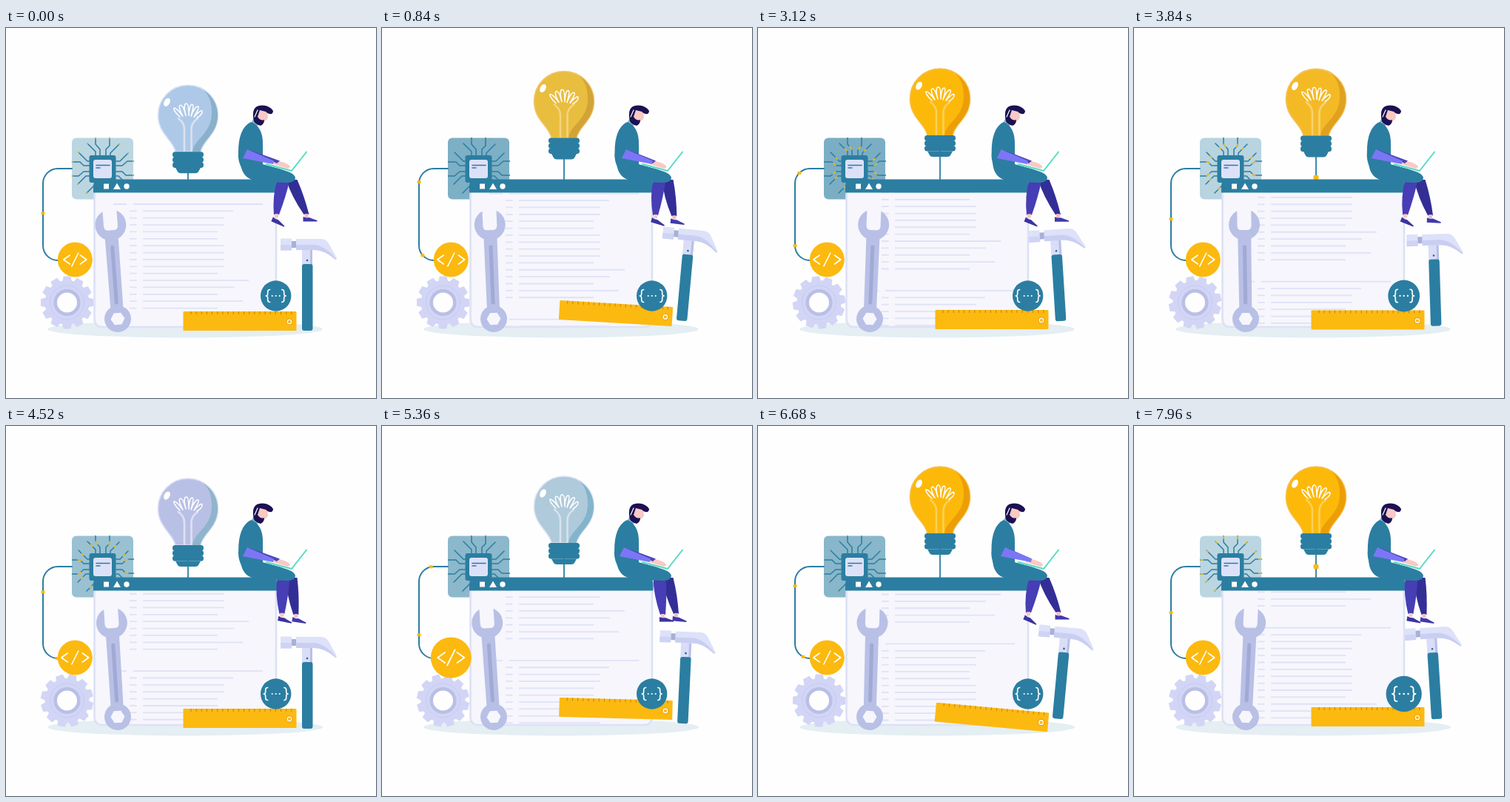
An HTML page that plays this animation: 500 by 500 pixels, repeating every 8000 ms.

```html
<!DOCTYPE html>
<html lang="en">
<head>
<meta charset="utf-8">
<title>Development tools</title>
<style>
html, body { margin: 0; width: 100%; height: 100%; overflow: hidden; background: #fefefe; }
svg { display: block; width: 100%; height: 100%; }
.line { fill: none; stroke-linecap: round; stroke-linejoin: round; }
</style>
</head>
<body>
<svg viewBox="0 0 500 500">
  <defs>
    <clipPath id="page"><rect x="120" y="222" width="245" height="182"/></clipPath>
  </defs>
  <ellipse cx="242" cy="407" rx="186" ry="11.5" fill="#e4eef3"/>

  <g id="board">
    <rect id="plate" x="89" y="148.500" width="83" height="83" rx="6" fill="#2b7ea1"/>
    <g id="traces" class="line" transform="translate(131 190)" stroke="#2b7ea1" stroke-width="1.5"></g>
    <g id="pulses" class="line" transform="translate(131 190)" stroke="#fcc11e" stroke-width="1.5" style="stroke-linecap:butt"></g>
    <rect x="112.500" y="172" width="36" height="37" rx="3" fill="#2b7ea1"/>
    <rect x="118" y="178" width="25" height="25" rx="3" fill="#dde1f8"/>
    <path class="line" d="M122 185.500h18M122 189h5" stroke="#2b7ea1" stroke-width="1.500"/>
  </g>

  <path id="cable" class="line" d="M70 314a20 20 0 0 1-20-20V210a20 20 0 0 1 20-20H89" stroke="#2b7ea1" stroke-width="2"/>
  <g id="cableDots" fill="#fcb90f"></g>

  <path d="M246 165V206" stroke="#2b7ea1" stroke-width="1.800"/>
  <rect id="wireDot" x="242.500" y="-3" width="7" height="6" rx="1.500" fill="#fcb90f"/>
  <g id="bulb">
    <path id="glass" stroke-width="1.600" d="M229 145C226 129 205.500 121 205.500 95.500A40.500 40.500 0 0 1 286.500 95.500C286.500 121 266 129 263 145Z"/>
    <path id="shade" d="M267 61.500A40 40 0 0 1 286 95.500C286 121 266 129 262.500 145H252C254 128 277 121 278 94C278.500 80 275 69 267 61.500Z"/>
    <path id="stems" class="line" stroke-width="2.600" d="M233 100Q241 106 241 114V145M259 100Q250.500 106 250.500 114V145"/>
    <path class="line" stroke="#fff" stroke-width="1.500" d="M235 98C228 92 225 85 228 86C232 87 238 96 239 97C234 88 233 82 236 82C239 82 242 92 243 96C240 84 241 79 244 80C247 80 247 90 247 96C247 88 249 80 252 81C255 83 251 92 250 97C252 91 257 82 260 84C262 86 256 94 254 98C259 92 264 88 265 90C266 93 262 97 258 99"/>
    <ellipse cx="217.500" cy="78" rx="3.800" ry="6" transform="rotate(28 217.500 78)" fill="#fff"/>
    <g fill="#2b7ea1">
      <rect x="225" y="145" width="42" height="7.600" rx="3.600"/>
      <rect x="225" y="152" width="42" height="7.600" rx="3.600"/>
      <rect x="225" y="159" width="42" height="7.600" rx="3.600"/>
      <path d="M229 166.500H263L260 172Q259 174 256 174H236Q233 174 232 172Z"/>
    </g>
  </g>

  <path d="M119.500 215V394a10 10 0 0 0 10 10H355a10 10 0 0 0 10-10V215Z" fill="#f6f6fc" stroke="#dde1f6" stroke-width="2.600"/>
  <g clip-path="url(#page)"><path id="code" stroke="#dfe2f7" stroke-width="1.800" fill="none"/></g>
  <path d="M118 222.500V212.500a8 8 0 0 1 8-8H358.500a8 8 0 0 1 8 8V222.500Z" fill="#2b7ea1"/>
  <path d="M132 210.500h7v7h-7ZM145 218l5-8.500 5 8.500Z" fill="#fff"/>
  <circle cx="163" cy="214" r="3.700" fill="#fff"/>

  <g id="gear" fill="#d2d5f5"><circle r="30"/></g>
  <g transform="translate(82.500 371)">
    <circle r="23" fill="none" stroke="#c3c8ee" stroke-width=".8"/>
    <circle r="15.800" fill="#fefefe" stroke="#b9bfe5" stroke-width="4.500"/>
  </g>

  <g id="wrench">
    <path d="M-9.500-146A21 21 0 1 0 9.500-146V-126Q9.500-120 4-120H-4Q-9.500-120-9.500-126Z" fill="#b9c0e6"/>
    <path d="M-9-112H9L8.500-10H-8.500Z" fill="#b9c0e6"/>
    <path class="line" d="M0-97V-22" stroke="#a1a9d5" stroke-width="5"/>
    <circle r="18" fill="#b9c0e6"/>
    <path d="M-9.500 0L-4.800-8H4.800L9.500 0L4.800 8H-4.800Z" fill="#f6f6fc"/>
  </g>

  <g id="ruler">
    <rect x="-76.500" y="-13" width="153" height="26" rx="1" fill="#fcb910"/>
    <path id="ticks" stroke="#c98612" stroke-width="1.100"/>
    <circle cx="67" cy="1" r="2.900" fill="#fcb910" stroke="#fff" stroke-width="1.500"/>
    <circle cx="67" cy="1" r="4" fill="none" stroke="#d88f10" stroke-width=".7"/>
  </g>

  <g id="codeBadge">
    <circle r="23.500" fill="#fcb90f"/>
    <g class="line" stroke="#fff" stroke-width="1.600">
      <path d="M4.500-9L-4.500 9"/>
      <path class="left" d="M-7-6L-15.500 0L-7 6"/><path class="right" d="M7-6L15.500 0L7 6"/>
    </g>
  </g>
  <g id="braceBadge">
    <circle r="20.700" fill="#2b7ea1"/>
    <path class="line" d="M-5 0h0M0 0h0M5 0h0" stroke="#fff" stroke-width="2.200"/>
    <g class="line" stroke="#fff" stroke-width="1.600">
      <path class="left" d="M-8-8.500Q-11-8.500-11-5.500V-3Q-11 0-13.500 0Q-11 0-11 3V5.500Q-11 8.500-8 8.500"/>
      <path class="right" d="M8-8.500Q11-8.500 11-5.500V-3Q11 0 13.500 0Q11 0 11 3V5.500Q11 8.500 8 8.500"/>
    </g>
  </g>

  <g id="hammer">
    <rect x="-7" y="-110" width="14" height="22" fill="#d9ddf7"/>
    <path d="M4-109H7V-89H4Z" fill="#b9c0e6"/>
    <rect x="-7" y="-90" width="14.500" height="90" rx="3" fill="#2b7ea1"/>
    <circle cy="-95" r="1.300" fill="#2b5d8a"/>
    <path d="M-23-121H-12V-112H-23Z" fill="#a9b0d8"/>
    <rect x="-36" y="-124.500" width="15" height="16" rx="1" fill="#dde1f9"/>
    <path d="M-36-116H-21V-108.500H-36Z" fill="#cfd3f4"/>
    <path d="M-15-124H19Q25-124 29-118L40-98Q40-95 37-97Q23-109 10-109H-15Z" fill="#dde1f9"/>
    <path d="M-15-116H8Q23-116 39-97Q39-95 37-97Q23-109 10-109H-15Z" fill="#c9cef2"/>
  </g>

  <g id="person">
    <g id="backLeg"><path class="leg" fill="#332e96"/><path class="ankle" fill="#f3bfc0"/><path class="shoe" fill="#4039ae"/></g>
    <g id="frontLeg"><path class="leg" fill="#473db4"/><path class="ankle" fill="#f9c9c4"/><path class="shoe" fill="#3b339f"/></g>
    <path d="M317 178C317 197 325 208 352 208L380 209C389 209 393 204 390 200C387 195 378 193 369 190L340 182Z" fill="#2b7ea1"/>
    <path d="M331 129L337 117L345 126L339 133Z" fill="#7fb6cc"/>
    <path id="torso" d="M-16-78C-28-72-33-58-33-37C-34-28-31-18-25-10L0-18V-46C1-64-6-75-16-78Z" fill="#2b7ea1"/>
    <path d="M339 110L353 112L354 121Q352 127 344 126L338 121Z" fill="#f9c9c4"/>
    <path d="M335 126C333 116 333 107 342 105C350 103 358 107 361 112C361 117 356 118 351 113L343 111L340 120Q344 126 349 124Q349 130 344 132Q337 130 335 126Z" fill="#1b1153"/>
    <path class="line" d="M336 120L340 111" stroke="#fff" stroke-width="1.200"/>
    <path d="M347 181L385 191.500L384 193.500L347 184Z" fill="#eefaf7"/>
    <path class="line" d="M352 184L386 193L406 167.500" stroke="#54dcc4" stroke-width="2"/>
    <path id="hand" d="M360 178L373 181Q381 183 384 187Q383 191 377 189L361 184Z" fill="#f9c9c4"/>
    <path id="sleeveBack" fill="#4b45bb"/>
    <path id="sleeve" fill="#7c76f6"/>
  </g>
</svg>
<script>
const LOOP = 8000;
const $ = id => document.getElementById(id);
const mod = (a, b) => ((a % b) + b) % b;
const set = (el, attrs) => { for (const k in attrs) el.setAttribute(k, attrs[k]); };
const add = (parent, tag, attrs) => {
  const el = document.createElementNS('http://www.w3.org/2000/svg', tag);
  set(el, attrs);
  return parent.appendChild(el);
};

// Periodic track of [seconds, value] keys, joined by monotone curves.
function track(keys, period) {
  const n = keys.length;
  const x = i => keys[mod(i, n)][0] + period * Math.floor(i / n);
  const v = i => keys[mod(i, n)][1];
  const slope = i => (v(i + 1) - v(i)) / (x(i + 1) - x(i));
  const tangent = i => {
    const a = slope(i - 1), b = slope(i);
    return a * b <= 0 ? 0 : 2 * a * b / (a + b);
  };
  return time => {
    const t = mod(time, period);
    let i = -1;
    while (x(i + 1) <= t) i++;
    const h = x(i + 1) - x(i), p = (t - x(i)) / h, q = 1 - p;
    return v(i) * (1 + 2 * p) * q * q + h * tangent(i) * p * q * q
      + v(i + 1) * p * p * (3 - 2 * p) - h * tangent(i + 1) * p * p * q;
  };
}

const bulbY = track([[0, 22.3], [.36, 13], [.87, 3], [1.08, 0], [3.76, 0], [4, 2.5], [4.24, 9], [4.52, 16], [4.78, 21.5], [4.9, 23]], 5);
const hammerX = track([[0, 407], [.36, 406], [.9, 404.7], [1.78, 404.7], [2.52, 409], [3.38, 409], [4.3, 407]], 5);
const hammerY = track([[0, 409], [.36, 402], [.9, 395.5], [1.78, 395.5], [2.52, 396], [3.38, 396], [4.3, 409]], 5);
const hammerTurn = track([[0, 0], [.36, 2.7], [.9, 5.3], [1.78, 5.3], [2.52, -3.6], [3.38, -3.6], [4.3, 0]], 5);
const rulerY = track([[0, 396], [.36, 382], [.9, 386], [1.68, 393.5], [1.8, 394.5], [2.1, 396], [2.6, 393], [2.96, 393], [3.12, 394], [4.52, 395]], 5);
const rulerTurn = track([[0, 0], [.36, 1.6], [.9, 3.6], [1.5, 5.3], [1.68, 5.2], [1.8, 4.6], [2.55, 0]], 5);
const elbow = track([[0, 320], [1.7, 328], [3, 323], [4.52, 320]], 5);
const frontHeel = track([[0, 361], [.15, 360.7], [1.2, 368.5], [1.8, 374.5], [2, 375], [3.12, 362]], 10 / 3);
const backHeel = track([[0, 401.5], [1.2, 387.3], [1.32, 387.5], [1.8, 389.5], [2.03, 393], [3.12, 401]], 10 / 3);
const spread = track([[.15, 0], [.45, 3], [1.13, 3], [1.3, 0]], 2);
const codeScale = track([[1.14, 1], [1.36, 1.17], [1.72, 1]], 2);
const braceScale = track([[0, 1], [1.8, 1], [1.95, 1.19]], 2);

const colourTimes = [0, .36, 1, 3.75, 4.45, 5];
const hex = c => [1, 3, 5].map(i => parseInt(c.slice(i, i + 2), 16));
function colours(cold, cool, warm, fading) {
  const stops = [cold, cool, warm, warm, fading, cold].map(hex);
  return time => {
    const t = mod(time, 5);
    const i = colourTimes.findLastIndex(s => s <= t);
    const p = (t - colourTimes[i]) / (colourTimes[i + 1] - colourTimes[i]);
    return `rgb(${stops[i].map((c, k) => Math.round(c + (stops[i + 1][k] - c) * p))})`;
  };
}
const glassFill = colours('#aec9e8', '#aecadb', '#fdb90a', '#bbbfe5');
const shadeFill = colours('#8ab0cc', '#82b5cb', '#ec9e06', '#8fb6cc');
const rim = colours('#d9e2f5', '#dbe3f5', '#f8bd45', '#d9dcf5');
const stemFill = colours('#dce2f0', '#d8e2ec', '#fdd05a', '#dfe1f4');

// Circuit traces: one side, turned four times.
const side = ['M-4-18V-26L-10-33V-41.5', 'M4-18V-26L9-31V-41.5', 'M-10-18V-23L-21-34', 'M10-18V-21L22-33'];
const pulses = [];
for (let turn = 0; turn < 360; turn += 90) {
  for (const d of side) {
    const attrs = { d, transform: `rotate(${turn})` };
    add($('traces'), 'path', attrs);
    pulses.push(add($('pulses'), 'path', { ...attrs, pathLength: 100, 'stroke-dasharray': '22 300' }));
  }
}

for (let i = 0; i < 12; i++) {
  add($('gear'), 'path', { d: 'M-6-28L-4.500-35H4.500L6-28Z', transform: `rotate(${i * 30})`, 'stroke-linejoin': 'round', stroke: '#d2d5f5' });
}

set($('ticks'), { d: Array.from({ length: 20 }, (_, i) => `M${-66 + i * 7.15}-13v4`).join('') });

// Two listings of code, one below the other.
const ends = [307, 295, 295, 286, 286, 295, 295, 295, 295, 286, 328, 308, 286, 320, 286];
const listing = y => `M145 ${y}H163M172 ${y}H347` +
  ends.map((x, i) => `M167 ${y + 9.37 * (i + 1)}h9.500M185 ${y + 9.37 * (i + 1)}H${x}`).join('');
set($('code'), { d: listing(238) + listing(408) });

const cable = $('cable'), cableLength = cable.getTotalLength();
const cableDots = [0, 1].map(() => add($('cableDots'), 'rect', { x: -2.5, y: -2, width: 5, height: 4, rx: 1 }));

function drawLeg(id, x, width, heel, y, turn) {
  const g = $(id), ankle = heel + 4;
  set(g.querySelector('.leg'), {
    d: `M${x - width / 2} 205Q${(x - width / 2 + ankle) / 2 - 6} 228 ${ankle - 3} ${y - 3}L${ankle + 4} ${y - 3}Q${(x + width / 2 + ankle) / 2 + 4} 228 ${x + width / 2} 205Z`
  });
  set(g.querySelector('.ankle'), { d: `M${ankle - 2} ${y - 4}h5v5h-5Z` });
  set(g.querySelector('.shoe'), { d: 'M0 0Q4 2 8 1Q13 3 19 5V6.500H0Z', transform: `translate(${heel} ${y}) rotate(${turn})` });
}

function drawBadge(id, x, y, scale, gap) {
  const g = $(id);
  set(g, { transform: `translate(${x} ${y}) scale(${scale})` });
  set(g.querySelector('.left'), { transform: `translate(${-gap} 0)` });
  set(g.querySelector('.right'), { transform: `translate(${gap} 0)` });
}

function draw(t) {
  const swing = Math.cos(t * Math.PI * 2 / 5);

  set($('code'), { transform: `translate(0 ${-17 * t})` });
  set($('gear'), { transform: `translate(82.500 371) rotate(${36 * t})` });
  set($('wrench'), { transform: `translate(151 393) rotate(${-.45 - 3.88 * swing})` });

  set($('bulb'), { transform: `translate(0 ${bulbY(t)})` });
  set($('glass'), { fill: glassFill(t), stroke: rim(t) });
  set($('shade'), { fill: shadeFill(t) });
  set($('stems'), { stroke: stemFill(t) });
  const climb = mod(t - 1.8, 2);
  set($('wireDot'), { transform: `translate(0 ${206 - 100 * climb})`, visibility: climb < .42 ? 'visible' : 'hidden' });

  set($('plate'), { 'fill-opacity': .47 - .155 * Math.cos(Math.PI * t) });
  const flow = mod(t * 1.5 - .42, 1) / .61;
  for (const p of pulses) {
    set(p, { 'stroke-dashoffset': 22 - flow * 122, visibility: flow < 1 ? 'visible' : 'hidden' });
  }
  cableDots.forEach((dot, i) => {
    const s = mod(75 + 50 * t, 100) + i * 100;
    const p = cable.getPointAtLength(Math.min(s, cableLength));
    set(dot, { transform: `translate(${p.x} ${p.y})`, visibility: s <= cableLength + 1 ? 'visible' : 'hidden' });
  });

  drawBadge('codeBadge', 93.3, 313, codeScale(t), spread(t));
  drawBadge('braceBadge', 364.7, 362, braceScale(t), spread(t));

  set($('ruler'), { transform: `translate(316 ${rulerY(t)}) rotate(${rulerTurn(t)})` });
  set($('hammer'), { transform: `translate(${hammerX(t)} ${hammerY(t)}) rotate(${hammerTurn(t)})` });

  const front = frontHeel(t), back = backHeel(t), e = elbow(t);
  drawLeg('backLeg', 386, 15, back, 258 - (back - 387) * .2, (401 - back) * .6);
  drawLeg('frontLeg', 375, 17, front, 258 - (375 - front) * .2, (375 - front) * 1.7);
  set($('torso'), { transform: `translate(347 205) scale(${.97 + .03 * swing} 1)` });
  set($('sleeveBack'), { d: `M${e + 7} 164L370 179.500L366 183Z` });
  set($('sleeve'), { d: `M${e} 176L${e + 6} 164L${362 + (e - 320)} 179.500L${361 + (e - 320)} 184Z` });
  set($('hand'), { transform: `translate(${(320 - e) * -.12} 0)` });
}

function frame() {
  draw(performance.now() % LOOP / 1000);
  requestAnimationFrame(frame);
}
frame();
</script>
</body>
</html>
```
